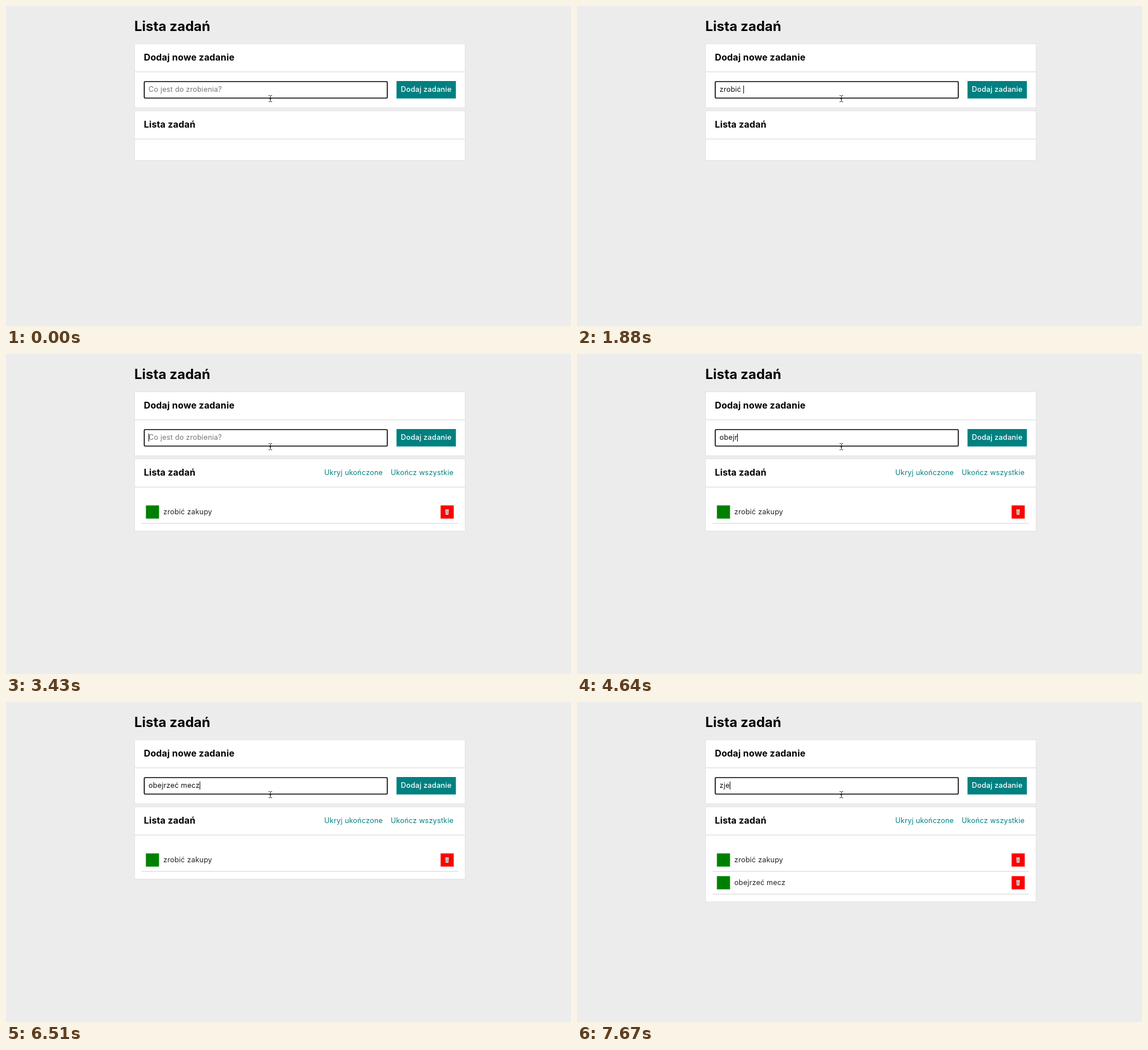
These frames come from a looping animation (995 by 563 pixels, 8000 ms). An HTML page:

```html
<!DOCTYPE html>
<html lang="pl">
<head>
<meta charset="utf-8">
<title>Lista zadań</title>
<style>
  html, body { margin: 0; width: 100%; height: 100%; overflow: hidden; background: #ececec; }
  svg { display: block; width: 995px; height: 563px; }
  text { font: 400 12.5px Inter, sans-serif; letter-spacing: .02em; white-space: pre; }
  .h1 { font-size: 24px; font-weight: 700; letter-spacing: 0; }
  .h2 { font-size: 16px; font-weight: 700; letter-spacing: .01em; }
  .btn { font-size: 12.8px; font-weight: 500; letter-spacing: .015em; fill: #fff; }
  .link { fill: #008080; }
  .item { fill: #222; }
  .panel { fill: #fff; stroke: #e2e2e2; }
  .rule { fill: #e2e2e2; }
</style>
</head>
<body>
<svg viewBox="0 0 995 563">
  <rect width="995" height="563" fill="#ececec"/>
  <text class="h1" x="226" y="44">Lista zadań</text>

  <rect class="panel" x="226.5" y="66.5" width="582" height="112.5"/>
  <rect class="rule" x="227" y="115" width="581" height="1.5"/>
  <text class="h2" x="242.7" y="96">Dodaj nowe zadanie</text>
  <rect x="243.5" y="133" width="428" height="29" rx="1.5" fill="#fff" stroke="#000" stroke-width="1.7"/>
  <text id="field" x="251" y="151"></text>
  <rect id="caret" y="140" width="1" height="14"/>
  <rect x="687.7" y="132" width="104.6" height="30.7" fill="#008080"/>
  <text class="btn" x="695.3" y="150.7">Dodaj zadanie</text>

  <rect id="list" class="panel" x="226.5" y="184.5" width="582" height="87"/>
  <rect class="rule" x="227" y="233.5" width="581" height="1.5"/>
  <text class="h2" x="242.7" y="214">Lista zadań</text>
  <g id="links">
    <text class="link" x="560.5" y="213">Ukryj ukończone</text>
    <text class="link" x="677.5" y="213">Ukończ wszystkie</text>
  </g>
  <g id="rows"></g>

  <path d="M462.5 157.5h2l1 1 1-1h2M465.5 158v10M462.5 168.5h2l1-1 1 1h2M464 163.5h3" fill="none" stroke="#222"/>
</svg>
<script>
const LOOP = 8000;
const HINT = 'Co jest do zrobienia?';

// keys: time of each keystroke; done: submitted; blink: caret goes dark afterwards
const tasks = [
  { text: 'zrobić zakupy', done: 3430, blink: 3560,
    keys: [70, 400, 600, 800, 1010, 1410, 1690, 1890, 2080, 2280, 2550, 2780, 3020] },
  { text: 'obejrzeć mecz', done: 6710, blink: 7070,
    keys: [3760, 4030, 4230, 4430, 4640, 4960, 5170, 5500, 5680, 5860, 6040, 6310, 6510] },
  { text: 'zje', done: LOOP, blink: LOOP, keys: [7270, 7470, 7670] }
];

const $ = id => document.getElementById(id);
const field = $('field'), caret = $('caret'), list = $('list'), links = $('links');

const rowMarkup = (text, i) => `
  <g transform="translate(0 ${40 * i})">
    <rect x="246.4" y="266.4" width="23.1" height="23.2" fill="#008000"/>
    <text class="item" x="277" y="282">${text}</text>
    <rect x="765.4" y="266.4" width="23.1" height="23.2" fill="#f00"/>
    <path d="M773.5 273h6.5l-.8 10h-4.9z" fill="#d5cdca"/>
    <path d="M773.5 273.5h6.5M775.7 275.5v6M777.7 275.5v6" stroke="#94827f" stroke-width=".7"/>
    <rect class="rule" x="239" y="297.2" width="557" height="1.6"/>
  </g>`;
$('rows').innerHTML = tasks.slice(0, 2).map((task, i) => rowMarkup(task.text, i)).join('');
const rows = [...$('rows').children];

const show = (el, on) => el.setAttribute('visibility', on ? 'visible' : 'hidden');

function draw(t) {
  const count = tasks.filter(task => t >= task.done).length;
  const task = tasks[count], last = tasks[count - 1];
  const typed = task.text.slice(0, task.keys.filter(k => t >= k).length);

  field.textContent = typed || HINT;
  field.setAttribute('fill', typed ? '#111' : '#757575');
  const width = typed ? field.getComputedTextLength() : 0;
  caret.setAttribute('x', Math.round(251 + width));
  show(caret, typed || (last && t < last.blink));

  list.setAttribute('height', 87 + 40 * count);
  show(links, count);
  rows.forEach((row, i) => show(row, i < count));
}

const start = performance.now();
function tick() {
  draw((performance.now() - start) % LOOP);
  requestAnimationFrame(tick);
}
tick();
</script>
</body>
</html>
```
